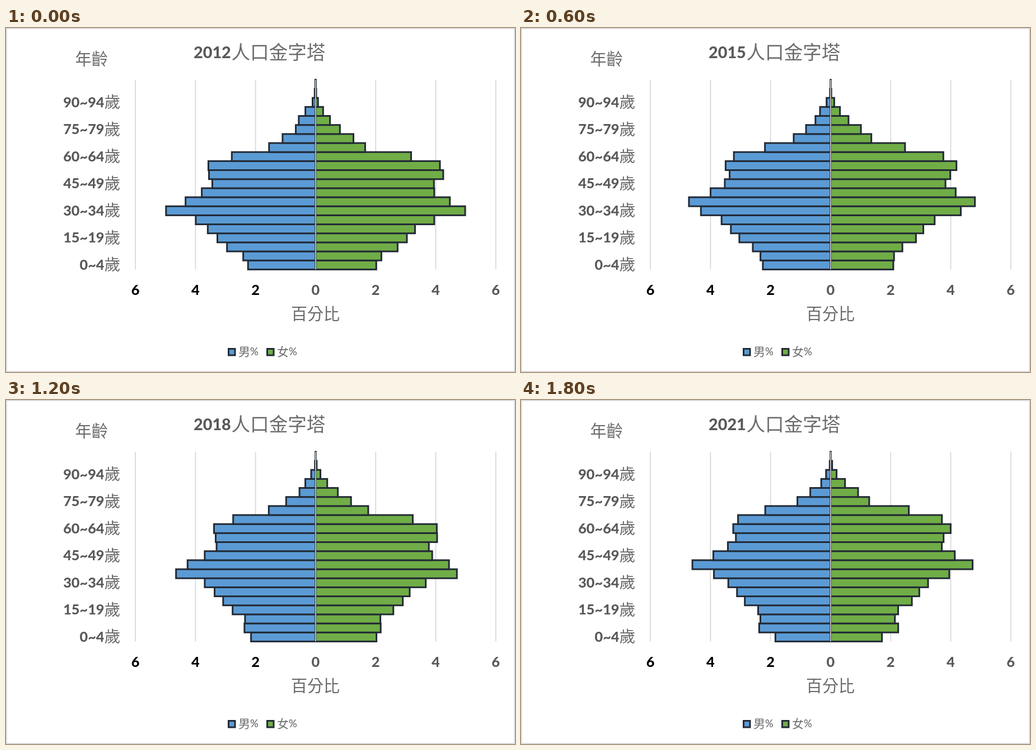
These frames come from a looping animation (909x616 px, 2000 ms). An HTML page with a canvas:

```html
<!DOCTYPE html>
<html lang="zh-Hant">
<head>
<meta charset="utf-8">
<title>人口金字塔</title>
<style>
  html, body { margin: 0; width: 100%; height: 100%; overflow: hidden; background: #fff; }
  canvas { display: block; }
</style>
</head>
<body>
<canvas id="stage" width="909" height="616"></canvas>
<script>
const ctx = document.getElementById('stage').getContext('2d');

const FIRST_YEAR = 2012, YEARS = 10, STEP = 200;
const AXIS_X = 552.9, TICK = 107.27, TOP = 92.8, BOTTOM = 432.4, ROWS = 21;
const ROW_H = (BOTTOM - TOP) / ROWS;
const GRAY = '#595959', LINE = '#d9d9d9', EDGE = '#222a35';
const CJK = '"Noto Sans CJK TC", "Noto Sans CJK", sans-serif';
const LATIN = 'Lato, sans-serif';

// cohorts: percent per five-year birth cohort, from two cohorts unborn in the
// first year to the oldest. fade: loss of share per age step. frailty: old-age loss.
const men = {
  side: -1, color: '#5b9bd5', fade: 0.04, frailty: 0.069,
  cohorts: [1.77, 2.22, 2.25, 2.41, 2.95, 3.27, 3.59, 3.99, 4.98, 4.33, 3.79, 3.44,
    3.55, 3.57, 2.79, 1.55, 1.1, 0.66, 0.56, 0.34, 0.1, 0.03, 0.01]
};
const women = {
  side: 1, color: '#70ad47', fade: 0.028, frailty: 0.042,
  cohorts: [1.64, 2.09, 2.02, 2.19, 2.73, 3.04, 3.31, 3.95, 4.98, 4.47, 3.95, 3.94,
    4.25, 4.14, 3.18, 1.65, 1.26, 0.81, 0.48, 0.25, 0.08, 0.02, 0.01]
};

// Catmull-Rom curve through evenly spaced points.
function spline(points, pos) {
  const i = Math.floor(pos), u = pos - i;
  const at = k => points[Math.max(0, Math.min(points.length - 1, k))];
  const a = at(i - 1), b = at(i), c = at(i + 1), d = at(i + 2);
  return b + u / 2 * (c - a + u * (2 * a - 5 * b + 4 * c - d + u * (3 * (b - c) + d - a)));
}

// Log of a cohort's size along its life: early gain, slow fade, then old-age loss.
function lifeLog({ fade, frailty }, age) {
  return -fade * age - 0.15 * Math.exp(-age) - frailty * 1.9 ** (age - 13);
}

// Every cohort climbs one row in five years.
function share(sex, row, year) {
  const cohort = row - (year - FIRST_YEAR) / 5;
  const startAge = Math.max(0, cohort);
  const size = Math.max(0, spline(sex.cohorts, cohort + 2));
  return size * Math.exp(lifeLog(sex, row) - lifeLog(sex, startAge));
}

function text(str, x, y, size, { family = LATIN, weight = 800, color = GRAY, align = 'left' } = {}) {
  ctx.font = `${weight} ${size}px ${family}`;
  ctx.fillStyle = color;
  ctx.textAlign = align;
  ctx.fillText(str, x, y);
}

function cjk(str, x, y, size) {
  text(str, x, y, size, { family: CJK, weight: 300, color: '#6b6b6b' });
}

function box(x, y, w, h, color) {
  ctx.fillStyle = color;
  ctx.strokeStyle = EDGE;
  ctx.lineWidth = 3;
  ctx.fillRect(x, y, w, h);
  ctx.strokeRect(x, y, w, h);
}

function vline(x, width) {
  ctx.fillStyle = LINE;
  ctx.fillRect(x - width / 2, TOP, width, BOTTOM - TOP);
}

function drawBars(sex, year) {
  for (let row = 0; row < ROWS; row++) {
    const width = share(sex, row, year) * TICK / 2;
    const x = sex.side < 0 ? AXIS_X - width : AXIS_X;
    box(x, BOTTOM - (row + 1) * ROW_H, width, ROW_H, sex.color);
  }
}

function drawLabels(year) {
  text(String(year), 335, 54, 28.8);
  cjk('人口金字塔', 402.5, 55.5, 33.6);
  cjk('年齡', 123.5, 66, 29.2);
  cjk('百分比', 509, 522.5, 29);

  for (let row = 0; row <= 18; row += 3) {
    const y = BOTTOM - (row + 0.5) * ROW_H + 8.5;
    text(`${row * 5}~${row * 5 + 4}`, 175.5, y, 25.3, { align: 'right' });
    cjk('歲', 175.5, y + 1.5, 28.8);
  }
  for (let i = -3; i <= 3; i++) {
    text(String(Math.abs(i * 2)), AXIS_X + i * TICK, 478, 25.3,
      { align: 'center', color: i < 0 ? '#000' : GRAY });
  }
}

function drawLegend(x, label, color) {
  box(x + 1.5, 574.5, 11.5, 11.5, color);
  cjk(label, x + 19, 587, 21);
  text('%', x + 40, 586, 18.5, { weight: 400 });
}

function draw(year) {
  ctx.fillStyle = '#fff';
  ctx.fillRect(0, 0, 909, 616);
  ctx.strokeStyle = LINE;
  ctx.lineWidth = 2;
  ctx.strokeRect(0.75, 0.75, 907.5, 614.5);

  for (let i = -3; i <= 3; i++) vline(AXIS_X + i * TICK, 1.8);
  drawBars(men, year);
  drawBars(women, year);
  vline(AXIS_X, 1.6);

  drawLabels(year);
  drawLegend(396, '男', men.color);
  drawLegend(465, '女', women.color);
}

function frame() {
  draw(FIRST_YEAR + Math.floor(performance.now() / STEP) % YEARS);
  requestAnimationFrame(frame);
}
frame();
</script>
</body>
</html>
```
